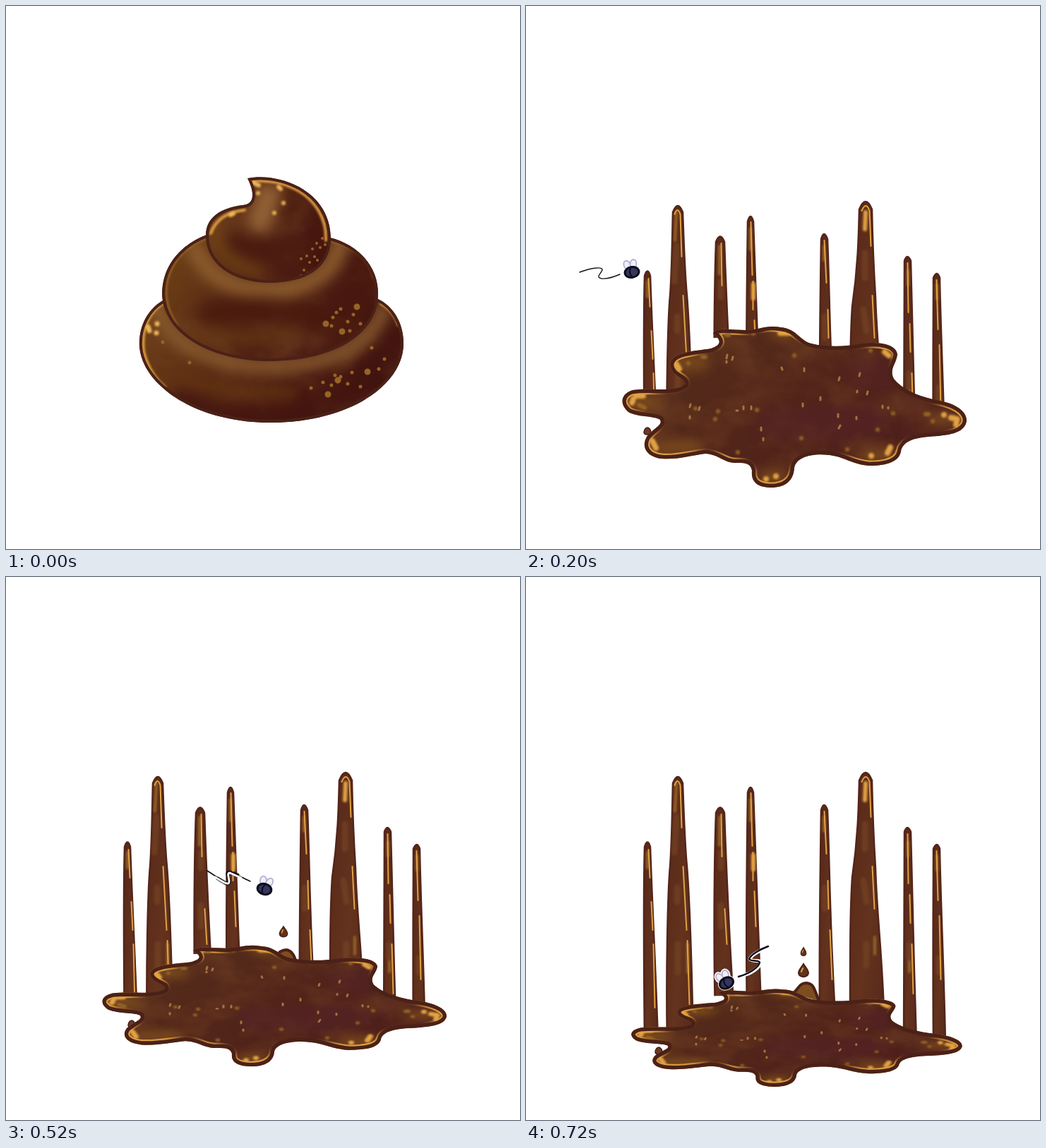
These frames come from a looping animation (728x769 px, 0.8 s). An HTML page without scripts:

```html
<!DOCTYPE html>
<html lang="en">
<head>
<meta charset="utf-8">
<title>Splat</title>
<style>
html, body { margin: 0; width: 100%; height: 100%; overflow: hidden; background: #fff; }
svg { display: block; width: 100%; height: 100%; }
.scene { visibility: hidden; animation: long 800ms step-end infinite; }
.short { animation-name: short; }
@keyframes short { 0% { visibility: visible; } 12.5%, 100% { visibility: hidden; } }
@keyframes long { 0% { visibility: visible; } 25%, 100% { visibility: hidden; } }
.edge { vector-effect: non-scaling-stroke; }
/* outlines are clipped to their shape, so half of the width shows */
.line { fill: none; stroke: #4b2117; stroke-width: 8; stroke-linejoin: round; }
.stroke { fill: none; stroke-linecap: round; stroke-linejoin: round; }
.gold { stroke: #e2a343; }
.dim { stroke: #966425; }
.blur { filter: blur(9px); }
.soft { filter: blur(1.5px); }
.crumb { fill: #6b3a25; stroke: #42190f; stroke-width: 1.5; }
</style>
</head>
<body>
<svg viewBox="0 0 728 769" preserveAspectRatio="none">
<defs>
  <filter id="cloud" x="0" y="0" width="1" height="1" color-interpolation-filters="sRGB">
    <feTurbulence type="fractalNoise" baseFrequency=".014 .018" numOctaves="4" seed="7"/>
    <feColorMatrix values="0 0 0 0 .45  0 0 0 0 .26  0 0 0 0 .14  1.4 0 0 0 -.56"/>
    <feComposite in2="SourceAlpha" operator="in" result="mist"/>
    <feMerge><feMergeNode in="SourceGraphic"/><feMergeNode in="mist"/></feMerge>
  </filter>
  <linearGradient id="mud" x2="1" y2=".6">
    <stop stop-color="#56301b"/><stop offset=".5" stop-color="#52261a"/><stop offset="1" stop-color="#4e1f1c"/>
  </linearGradient>
  <linearGradient id="tier" x2="1" y2=".45">
    <stop stop-color="#714418"/><stop offset=".5" stop-color="#592914"/><stop offset="1" stop-color="#421410"/>
  </linearGradient>
  <linearGradient id="bark" y2="1">
    <stop stop-color="#572718"/><stop offset=".6" stop-color="#63331e"/><stop offset="1" stop-color="#59281b"/>
  </linearGradient>

  <path id="base" d="M222 417C200 430 187 455 189 483C193 535 265 590 376 590C490 589 563 535 563 478C563 448 548 425 527 415Z"/>
  <path id="middle" d="M284 324C245 339 221 370 221 408C223 465 290 503 375 503C470 502 527 462 527 408C527 365 495 337 459 328Z"/>
  <path id="top" d="M342 244C385 235 460 260 460 330C459 371 425 392 372 392C320 391 283 365 283 325C283 300 303 286 335 282C350 281 354 268 342 244Z"/>
  <clipPath id="inBase"><use href="#base"/></clipPath>
  <clipPath id="inMiddle"><use href="#middle"/></clipPath>
  <clipPath id="inTop"><use href="#top"/></clipPath>

  <path id="splat" d="M262 266C261 248 276 240 290 240C308 242 306 267 326 268C340 268 352 264 366 270C386 279 386 311 418 320C436 325 464 324 472 316C484 299 492 284 510 284C533 286 540 302 533 326C523 355 518 385 520 408C524 432 534 445 556 456C588 462 617 482 617 508C615 535 596 549 566 555C546 557 531 561 530 573C529 590 534 604 521 618C508 631 486 629 466 617C446 601 436 600 416 602C396 605 389 620 387 640C386 662 376 681 356 681C339 680 332 664 333 646C332 630 330 619 318 623C304 627 294 618 288 609C276 597 262 601 248 609C226 617 203 615 190 599C180 580 186 564 202 552C218 538 213 518 203 506C192 494 176 495 162 488C150 478 154 461 171 456C196 453 224 455 235 438C240 420 222 405 213 388C203 368 208 350 229 342C256 336 268 318 271 302C273 286 262 280 262 266Z"/>
  <clipPath id="inSplat"><use href="#splat"/></clipPath>
  <mask id="splatTips" maskUnits="userSpaceOnUse" x="0" y="0" width="728" height="769">
    <path class="stroke blur" stroke="#fff" stroke-width="40" d="M285 246h0M365 275h0M513 290h0M600 480h0M606 530h0M500 622h0M470 615h0M355 672h0M300 615h0M230 608h0M192 585h0M164 465h0M214 360h0M222 386h0"/>
  </mask>

  <path id="puddle" class="edge" d="M265 464C267 454 292 459 312 459C330 459 340 451 360 455C384 457 386 473 404 478C424 483 452 483 476 478C500 475 525 479 526 494C524 508 514 514 521 528C532 542 552 551 576 557C604 561 625 572 624 588C621 605 600 608 570 610C545 612 533 619 531 631C528 646 510 651 486 651C462 649 452 639 430 636C404 633 383 639 380 654C379 672 368 682 346 682C323 681 319 670 320 658C318 646 308 647 294 647C278 645 272 635 254 634C236 636 214 643 192 641C173 639 162 626 171 610C180 598 194 594 190 586C182 580 160 583 145 575C132 564 134 549 151 544C176 540 210 548 225 536C228 526 205 526 204 508C205 489 240 489 262 485C276 480 278 474 265 464Z"/>
  <clipPath id="inPuddle"><use href="#puddle"/></clipPath>
  <mask id="puddleTips" maskUnits="userSpaceOnUse" x="0" y="0" width="728" height="769">
    <path class="stroke blur" stroke="#fff" stroke-width="32" d="M275 462h20M355 455h20M500 480h20M600 562l18 10l4 24M520 632l-12 16h-40M370 674h-40M290 644h-10M230 636h-50l-8 -20M143 566l4 -18h24M210 520l-2 -16 20 -12"/>
  </mask>
  <g id="pool" clip-path="url(#inPuddle)">
    <use href="#puddle" fill="url(#mud)" filter="url(#cloud)"/>
    <path class="stroke blur" stroke="#55232a" stroke-width="44" opacity=".5" d="M350 590H490M480 520H500"/>
    <path class="stroke blur" stroke="#87561f" stroke-width="18" opacity=".8" d="M150 562h30M215 506h35M190 625h50M336 666h26M480 636h38M575 585h30M355 462h16"/>
    <use href="#puddle" class="stroke gold edge" stroke-width="15" mask="url(#puddleTips)"/>
    <g class="soft stroke">
      <path class="gold" stroke-width="8" d="M152 556l-2 6M213 507l4 7M360 463h12M354 666h0M340 670h0M508 490l6 5M489 637h0M516 625l-4 8M602 583l9 2l-2 8M592 579h0M184 626l-5 -10M156 552h10"/>
      <path class="dim" stroke-width="6" d="M160 565l8 4M230 506h0M250 497h4M283 466h4M322 464h0M488 488h0M576 588h0M566 578h4M520 577h0M498 600h0M455 628h0M300 632h0M268 585h0M272 574h0M390 612h0M240 570h0M327 572h0M380 495h0"/>
    </g>
    <path class="stroke" stroke="#a5733f" stroke-width="3" d="M285 494l-1 5M293 497l-1 4M284 503v2M362 512l1 3M394 513v4M444 526l-1 4M473 520l-1 4M484 546l-1 4M469 545v2M417 554v4M392 563v4M308 567v4M319 567v4M298 573h2M233 564l-1 4M246 568l-1 4M232 581v3M333 597v4M336 612v3M442 578v4M445 594l-2 4M468 582v3M505 566v3M513 568v2"/>
    <use href="#puddle" class="line" style="stroke-width:10.5"/>
  </g>

  <path id="cut" d="M0 -999H728V565H345V470H250V565H0Z"/>
  <clipPath id="cutA"><use href="#cut"/></clipPath>
  <clipPath id="cutB"><use href="#cut" transform="matrix(1 0 0 .751 0 181)"/></clipPath>
  <clipPath id="cutC"><use href="#cut" transform="matrix(.961 0 0 .607 18 308)"/></clipPath>
  <g id="spikes">
    <g fill="url(#bark)" stroke="#53251b" stroke-width="2.5">
      <path d="M168 660C167 560 166 450 168 382Q172 369 176 382C179 470 184 560 187 660"/>
      <path d="M200 660C198 560 201 440 204 410C207 370 207 320 208 292Q215 274 222 292C224 350 226 390 228 410C233 470 235 560 237 660"/>
      <path d="M268 620C266 540 266 420 269 334Q275 319 281 334C284 420 287 500 295 620"/>
      <path d="M313 610C311 510 313 380 314 305Q318 291 322 305C325 380 328 480 333 610"/>
      <path d="M416 620C415 520 417 400 418 330Q422 316 427 330C430 400 430 490 438 620"/>
      <path d="M459 620C459 530 459 470 462 426C470 370 471 330 472 288Q481 266 490 288C491 340 493 380 495 412C497 480 505 540 507 620"/>
      <path d="M535 660C535 540 536 430 536 361Q540 349 545 361C546 430 550 560 553 660"/>
      <path d="M577 660C576 540 577 450 577 385Q582 373 586 385C587 450 592 560 594 660"/>
    </g>
    <g class="stroke soft">
      <path stroke="#784726" stroke-width="9" opacity=".55" d="M213 340l-3 50M214 440v20M215 520v40M276 390v22M276 465v30M423 440v30M480 350v35M478 430l4 30M482 520v30M543 520v20M585 540v20"/>
      <path class="dim" stroke-width="4" d="M172 390v22M213 292l-2 40M274 340v40M318 315v30M422 340v20M541 375v20M582 395v20M543 545v14M494 510v24M229 520v40"/>
    </g>
    <path class="stroke gold" stroke-width="2" transform="translate(-1.5)" d="M175 386l2 40M179 460l2 40M182 520l2 90M212 295q4 -12 8 0l2 60M224 410l5 90M230 515l3 90M278 336l1 60M283 470l3 50M320 306l2 75M323 390v40M325 445l2 50M424 332l3 60M429 430l1 40M432 500l3 70M477 290q6 -14 11 0l2 50M492 410l3 60M542 364l1 70M545 450l1 40M548 520l2 70M583 388l2 70M587 480l2 90"/>
    <path class="stroke gold soft" stroke-width="6" d="M481 292l-1 24M322 394v20"/>
  </g>

  <path id="tail" class="edge" d="M0 0C30 -14 55 -50 78 -50C93 -50 100 -20 100 0C100 20 93 50 78 50C55 50 30 14 0 0Z"/>
  <clipPath id="inTail"><use href="#tail"/></clipPath>
  <g id="drop" clip-path="url(#inTail)">
    <use href="#tail" fill="#532719"/>
    <path class="edge stroke soft" stroke="#b98c38" stroke-width="6" d="M64 -30C86 -42 92 -18 92 5"/>
    <path class="edge stroke dim" stroke-width="4" d="M84 -8h0M73 6h0M82 22h0M64 -6h0M70 24h0"/>
    <path class="edge stroke" stroke="#e0b654" stroke-width="2" d="M62 -30C84 -42 91 -18 91 5"/>
    <use href="#tail" class="line" style="stroke-width:6"/>
  </g>
  <path id="bead" class="crumb" d="M0 -5C3 -5 5 -1 5 2C4 6 -4 6 -5 2C-5 -1 -3 -5 0 -5Z"/>
  <g id="tear">
    <path d="M0 -10C3 -5 7 -2 7 3C6 10 -6 10 -7 3C-7 -2 -3 -5 0 -10Z" fill="#63331c" stroke="#4b2117" stroke-width="2"/>
    <path class="stroke gold" stroke-width="2" d="M-1 -4l-2 5"/>
  </g>

  <ellipse id="body" rx="10" ry="7.5"/>
  <g id="wings">
    <ellipse cx="-5" cy="-11" rx="4.5" ry="6.5" transform="rotate(-12 -5 -11)"/>
    <ellipse cx="4" cy="-11" rx="4.5" ry="6.5" transform="rotate(14 4 -11)"/>
  </g>
  <g id="fly">
    <g fill="#fff" stroke="#fff" stroke-width="5"><use href="#wings"/><use href="#body"/></g>
    <use href="#wings" fill="#f0eff9" stroke="#b4b1d3" stroke-width="1.8"/>
    <use href="#body" fill="#353560" stroke="#0b0b18" stroke-width="3"/>
    <path class="stroke" stroke="#0b0b18" stroke-width="2" d="M-1 -6Q-5 0 -1 6"/>
  </g>
</defs>

<g class="scene short">
  <g clip-path="url(#inBase)">
    <use href="#base" fill="url(#tier)" filter="url(#cloud)"/>
    <g class="stroke blur">
      <path stroke="#8d6032" stroke-width="20" opacity=".85" d="M215 425C222 470 280 508 375 510C470 508 520 475 534 430"/>
      <path stroke="#421410" stroke-width="34" opacity=".8" d="M430 560Q530 530 550 470M250 560Q330 590 420 580"/>
      <path stroke="#653510" stroke-width="14" opacity=".8" d="M240 525Q310 555 400 548"/>
    </g>
    <path class="stroke gold soft" stroke-width="4" d="M222 421C198 437 192 462 195 489Q202 520 225 540M531 421Q550 432 556 452"/>
    <path class="stroke soft" stroke="#efb95c" stroke-width="7" d="M201 454l2 6M214 450h0M213 463h0"/>
    <path class="stroke dim" stroke-width="5" d="M222 476h0M260 505h0M432 541h0M449 533h0M466 523h0M474 525h0M490 519h0M502 539h0M518 484h0M536 500h0M528 514h0M461 537h0M484 535h0"/>
    <path class="stroke dim" stroke-width="9" d="M456 550h0M470 530h0M512 518h0"/>
    <use href="#base" class="line"/>
  </g>

  <g clip-path="url(#inMiddle)">
    <use href="#middle" fill="url(#tier)" filter="url(#cloud)"/>
    <g class="stroke blur">
      <path stroke="#8e5f2f" stroke-width="26" opacity=".9" d="M268 345C285 385 325 402 372 402C430 402 465 375 472 338"/>
      <path stroke="#49190f" stroke-width="36" opacity=".85" d="M290 435Q370 420 440 445M510 360Q520 420 470 470"/>
      <path stroke="#683b13" stroke-width="14" opacity=".8" d="M260 462Q340 478 410 462M235 420l8 -40"/>
    </g>
    <path class="stroke dim soft" stroke-width="3" d="M284 329C247 343 226 373 227 408Q228 430 242 452M461 333Q512 345 521 385"/>
    <path class="stroke dim" stroke-width="5" d="M463 441h0M468 434h0M474 429h0M484 447h0M492 437h0M502 450h0M461 453h0M487 460h0"/>
    <path class="stroke dim" stroke-width="9" d="M453 450h0M497 426h0M476 461h0"/>
    <use href="#middle" class="line"/>
  </g>

  <g clip-path="url(#inTop)">
    <use href="#top" fill="url(#tier)" filter="url(#cloud)"/>
    <g class="stroke blur">
      <path stroke="#99693a" stroke-width="34" opacity=".85" d="M372 268L360 305"/>
      <path stroke="#47170f" stroke-width="30" opacity=".75" d="M440 300Q450 350 400 375M320 335Q360 350 400 335"/>
      <path stroke="#734716" stroke-width="16" opacity=".8" d="M298 320Q305 365 360 378"/>
    </g>
    <path class="stroke gold soft" stroke-width="4" d="M349 248C390 244 430 262 446 296Q454 312 453 332M338 289Q300 293 290 322"/>
    <path class="stroke soft" stroke="#edb75a" stroke-width="6" d="M350 250l8 4M318 296l4 -2M380 293h0M393 279h0M357 265h0M386 256l3 3"/>
    <path class="stroke dim" stroke-width="4" d="M418 358h0M426 354h0M434 344h0M440 336h0M448 329h0M445 342h0M437 355h0M430 363h0M422 374h0M418 382h0M428 378h0M441 360h0M452 338h0"/>
    <use href="#top" class="line"/>
  </g>
</g>

<g class="scene short" style="animation-delay:-700ms">
  <use href="#drop" transform="translate(274 234) rotate(-121) scale(.42 -.17)"/>
  <use href="#drop" transform="translate(340 261) rotate(-90) scale(.22 .09)"/>
  <use href="#drop" transform="translate(383 220) rotate(-79) scale(.21 .15)"/>
  <use href="#drop" transform="translate(390 275) rotate(-53) scale(.56 .27)"/>
  <use href="#drop" transform="translate(441 291) rotate(-55) scale(.98 .43)"/>
  <use href="#drop" transform="translate(517 402) rotate(-36) scale(.76 .34)"/>
  <use href="#drop" transform="translate(552 420) rotate(-6) scale(1.11 .46)"/>
  <use href="#drop" transform="translate(258 340) rotate(-136) scale(.6 -.38)"/>
  <use href="#drop" transform="translate(192 359) rotate(-155) scale(.33 -.22)"/>
  <use href="#drop" transform="translate(236 430) rotate(-171) scale(.25 -.13)"/>
  <use href="#drop" transform="translate(188 524) rotate(158) scale(.63 -.25)"/>
  <path class="line" style="fill:#532719;stroke-width:3" d="M261 628Q266 641 268 658Q262 689 249 696Q243 697 242 692L238 668Z"/>
  <path class="line" style="fill:#5a2b1b;stroke-width:3" d="M574 303C580 306 584 316 584 322C581 330 563 330 561 322C560 314 566 304 574 303Z"/>
  <path class="stroke gold soft" stroke-width="4" d="M254 662h0M244 672h0M254 677h0M246 691l6 -3M570 313h0M566 320h0"/>
  <path class="stroke" stroke="#4a2117" stroke-width="4.5" stroke-linecap="square" d="M334 219l1 1M346 232l1 1M336 233h0M391 287h1M402 282l1 1M415 285h2M397 294h0M413 295l1 1M403 295l2 1M381 273l-2 2M180 430h2M197 445l1 1M186 444h0M544 565h0M556 563h1M561 576h1M543 576h2M553 588l1 1M409 631h0M421 619l1 1M417 630h0"/>
  <path class="stroke" stroke="#4a2117" stroke-width="3" d="M318 229h0M325 229l1 2M322 238h1M326 241h0M189 452h1M536 589h1M546 588h0M390 295h1"/>

  <g clip-path="url(#inSplat)">
    <use href="#splat" fill="url(#mud)" filter="url(#cloud)"/>
    <path class="stroke blur" stroke="#52222a" stroke-width="60" opacity=".45" d="M450 370L420 500M360 540l120 20"/>
    <path class="stroke blur" stroke="#87561f" stroke-width="22" opacity=".75" d="M286 260h8M355 285h12M228 370l20 -10M172 475h14M208 585l16 8M352 655h4M484 606h16M582 508l18 6M508 300h8"/>
    <use href="#splat" class="stroke gold" stroke-width="13" mask="url(#splatTips)"/>
    <g class="soft stroke">
      <path class="gold" stroke-width="17" d="M363 285h0M227 376h2M354 663h2M210 592h-2M600 514h0"/>
      <path class="gold" stroke-width="10" d="M291 254l2 0M253 362l-1 3M170 475l2 -4M484 609h0M580 508h0M510 297h0M350 283h0"/>
      <path class="dim" stroke-width="6" d="M294 267h0M281 262h0M343 318h0M320 320h0M376 354h0M395 369h0M278 388h0M268 390h0M440 541h0M416 548h0M289 516h0M300 523h0M305 500h0M530 542h0M556 514h0M565 506h0M560 521h0M238 575h0M236 555h0M480 590h0M512 560h0M188 470h0M196 480h0M370 650h0M502 315h0M515 318h0"/>
    </g>
    <path class="stroke" stroke="#9a693c" stroke-width="3" d="M319 376l-1 4M325 380l-1 3M321 386v1M389 416v3M418 423v4M455 455l-2 5M450 480l-1 4M494 452l-1 5M503 456v2M334 471v3M346 470l-1 4M323 486v4M242 465l-1 3M250 438l-2 4M272 465v4M331 516v4M327 532l-1 4M479 503l-2 5M475 522l-2 6M436 488v2M500 515v3"/>
    <use href="#splat" class="line" style="stroke-width:9"/>
  </g>
  <use href="#bead" x="181" y="604"/><use href="#bead" x="201" y="416"/>
  <use href="#bead" x="434" y="303"/><use href="#bead" x="451" y="321"/>
  <use href="#bead" x="420" y="600"/><use href="#bead" x="266" y="600"/>
  <use href="#bead" x="391" y="624"/>
</g>

<g class="scene" style="animation-delay:-600ms">
  <g clip-path="url(#cutA)"><use href="#spikes"/></g>
  <use href="#bead" x="172" y="602"/>
  <use href="#pool"/>
  <path class="stroke" stroke="#14141f" stroke-width="1.4" d="M76 377C92 371 107 369 108 373C108 378 97 384 107 386C115 387 126 383 133 380"/>
  <use href="#fly" transform="translate(150 377) rotate(-10)"/>
</g>

<g class="scene" style="animation-delay:-400ms">
  <g clip-path="url(#cutB)"><use href="#spikes"/></g>
  <path class="line" style="fill:#7d4d20;stroke-width:4" d="M382 538Q388 528 397 528Q407 529 411 546"/>
  <use href="#bead" x="178" y="633"/>
  <use href="#pool" transform="matrix(1 0 0 .751 0 181)"/>
  <use href="#tear" transform="translate(393 503) scale(.8)"/>
  <g class="stroke">
    <path stroke="#0c0c18" stroke-width="1.6" d="M285 416C298 424 310 434 314 434C318 432 310 418 316 418C325 420 337 427 346 431"/>
    <path stroke="#0c0c18" stroke-width="5" d="M300 427C308 432 312 435 315 434C319 432 310 418 316 418L328 422"/>
    <path stroke="#fff" stroke-width="2.8" d="M296 425C308 432 312 435 315 434C319 432 311 419 317 419L333 426"/>
  </g>
  <use href="#fly" transform="translate(366 442) rotate(17)"/>
</g>

<g class="scene" style="animation-delay:-200ms">
  <g clip-path="url(#cutC)"><use href="#spikes"/></g>
  <path class="line" style="fill:#7d4d20;stroke-width:4" d="M376 590C385 588 385 575 397 575C409 576 408 585 415 600"/>
  <use href="#bead" x="188" y="671"/>
  <use href="#pool" transform="matrix(.961 0 0 .607 18 308)"/>
  <use href="#tear" transform="translate(393 531) scale(.55 .65)"/>
  <use href="#tear" x="393" y="558"/>
  <g class="stroke">
    <path stroke="#fff" stroke-width="5" d="M334 528C326 532 318 537 317 541C319 545 333 542 333 546C330 554 318 562 308 564"/>
    <path stroke="#0c0c18" stroke-width="2.4" d="M343 523C332 527 318 535 316 541C318 545 331 542 331 546C329 554 315 562 301 566"/>
  </g>
  <use href="#fly" transform="translate(284 575) rotate(-28)"/>
</g>
</svg>
</body>
</html>
```
